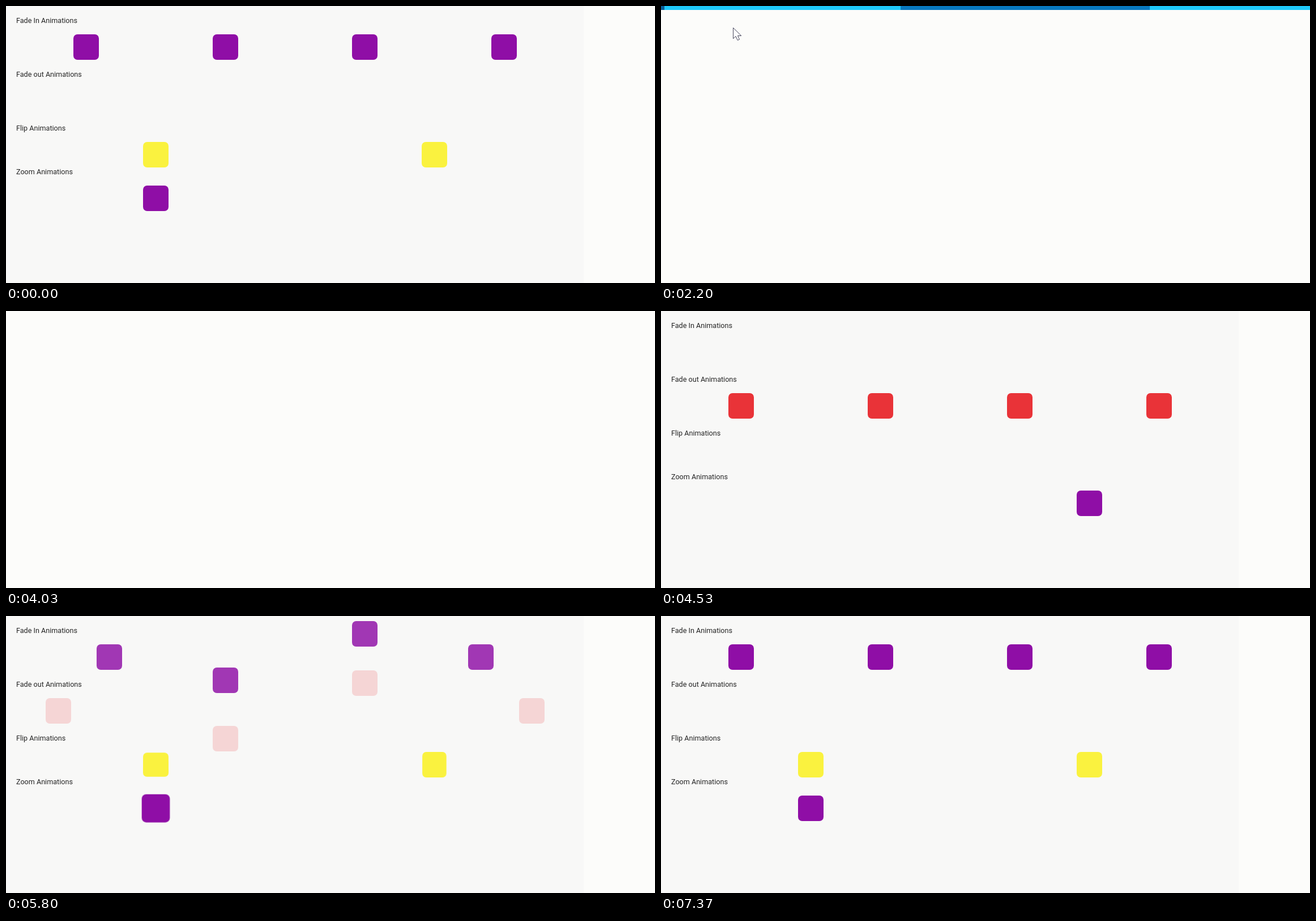
Animation of 1146 by 489 pixels, one loop 7440 ms. Source, as an HTML page:

```html
<!DOCTYPE html>
<html lang="en">
<head>
<meta charset="utf-8">
<title>Transition showcase</title>
<style>
  html, body { margin: 0; width: 100%; height: 100%; overflow: hidden; background: #fcfcfa; }
  body { position: relative; font: 12.6px/18px Roboto, sans-serif; color: #262626; }
  body * { position: absolute; }

  /* every animation shares one 7440 ms timeline */
  .page, .box, .loader, .bar, .cursor { animation: 7440ms linear infinite both; }

  .page { left: 0; top: 0; width: 1020px; height: 100%; background: #f8f8f7; animation-name: page; animation-timing-function: step-end; }
  .page p { left: 18px; margin: 0; white-space: nowrap; }

  .box { width: 45px; height: 45px; border-radius: 7.2px; background: #8f0ea6; }
  .out { background: #e93338; }
  .flip { background: #faf23f; }
  .in { animation-name: slide-in, appear; }
  .out { animation-name: slide-out, vanish; }
  .flip { animation-name: flip; }
  .grow { animation-name: grow; }
  .shrink { animation-name: shrink; }

  .loader { left: 0; top: 0; width: 100%; height: 7px; overflow: hidden; background: #1ec8f9; animation-name: loader; animation-timing-function: step-end; }
  .bar { left: -440px; width: 440px; height: 100%; background: #0878bf; animation-name: bar; }
  .bar.next { background: #0a5c96; animation-name: next-bar; }
  .cursor { left: 127px; top: 38px; width: 17px; height: 24px; animation-name: cursor; animation-timing-function: step-end; }

  @keyframes page {
    0% { opacity: 1; }
    14.38% { opacity: 0; }
    60.89%, 100% { opacity: 1; }
  }
  @keyframes slide-in {
    0%, 14.38% { transform: none; }
    14.4%, 75.08% { transform: translate(var(--x), var(--y)); animation-timing-function: ease; }
    84.22%, 100% { transform: none; }
  }
  @keyframes appear {
    0%, 14.38% { opacity: 1; }
    14.4%, 75.08% { opacity: 0; animation-timing-function: ease; }
    80.59%, 100% { opacity: 1; }
  }
  @keyframes slide-out {
    0%, 75.08% { transform: none; animation-timing-function: ease; }
    84.22%, 100% { transform: translate(var(--x), var(--y)); }
  }
  @keyframes vanish {
    0%, 14.38% { opacity: 0; }
    14.4%, 75.08% { opacity: 1; animation-timing-function: ease; }
    80.59%, 100% { opacity: 0; }
  }
  @keyframes flip {
    0%, 14.38% { transform: none; }
    14.4%, 75.67% { transform: perspective(360px) rotate3d(var(--axis), 90deg); animation-timing-function: ease; }
    80.4%, 100% { transform: none; }
  }
  @keyframes grow {
    0%, 14.38% { transform: none; }
    14.4%, 71.64% { transform: scale(0); }
    75.67% { transform: scale(.91); }
    77% { transform: scale(1.2); }
    79%, 100% { transform: none; }
  }
  @keyframes shrink {
    0%, 14.38% { transform: scale(0); }
    14.4%, 71.64% { transform: none; animation-timing-function: ease-in; }
    75.4%, 100% { transform: scale(0); }
  }
  @keyframes loader {
    0% { opacity: 0; }
    16.13% { opacity: 1; }
    41.67% { opacity: 0; }
    41.94% { opacity: 1; }
    48.39%, 100% { opacity: 0; }
  }
  @keyframes bar {
    0%, 16.26% { transform: none; }
    31.85%, 41.67% { transform: translateX(1010px); }
    41.68%, 41.94% { transform: none; }
    48.39%, 100% { transform: translateX(417px); }
  }
  @keyframes next-bar {
    0%, 29.49% { transform: none; }
    31.85%, 41.67% { transform: translateX(153px); }
    41.68%, 100% { transform: none; }
  }
  @keyframes cursor {
    0% { opacity: 0; }
    16.13% { opacity: 1; }
    54.17%, 100% { opacity: 0; }
  }
</style>
</head>
<body>
<div class="page">
  <p style="top:17px">Fade In Animations</p>
  <p style="top:112px">Fade out Animations</p>
  <p style="top:207px">Flip Animations</p>
  <p style="top:284px">Zoom Animations</p>
</div>
<div class="loader"><div class="bar"></div><div class="bar next"></div></div>
<svg class="cursor" viewBox="0 0 17 24">
  <path d="M.5 .5V19.5L5 15.5L8.3 22.5L11.5 21L8.5 14.5H14.8Z" fill="#fff" stroke="#33334a" stroke-width=".9"/>
</svg>
<script>
  const page = document.querySelector('.page');

  function addBox(kind, centerX, top, vars = {}) {
    const box = document.createElement('div');
    box.className = `box ${kind}`;
    box.style.left = `${centerX - 22.5}px`;
    box.style.top = `${top}px`;
    for (const name in vars) box.style.setProperty(`--${name}`, vars[name]);
    page.append(box);
  }

  // unit direction of each column's starting offset
  const directions = [[1, 0], [0, 1], [0, -1], [-1, 0]];
  directions.forEach(([dx, dy], i) => {
    const x = 141 + 246 * i;
    addBox('in', x, 50, { x: `${90 * dx}px`, y: `${90 * dy}px` });
    addBox('out', x, 145, { x: `${-90 * dx}px`, y: `${90 * dy}px` });
  });
  addBox('flip', 264, 240, { axis: '1, 0, 0' });
  addBox('flip', 756, 240, { axis: '0, 1, 0' });
  addBox('grow', 264, 317);
  addBox('shrink', 756, 317);
</script>
</body>
</html>
```
